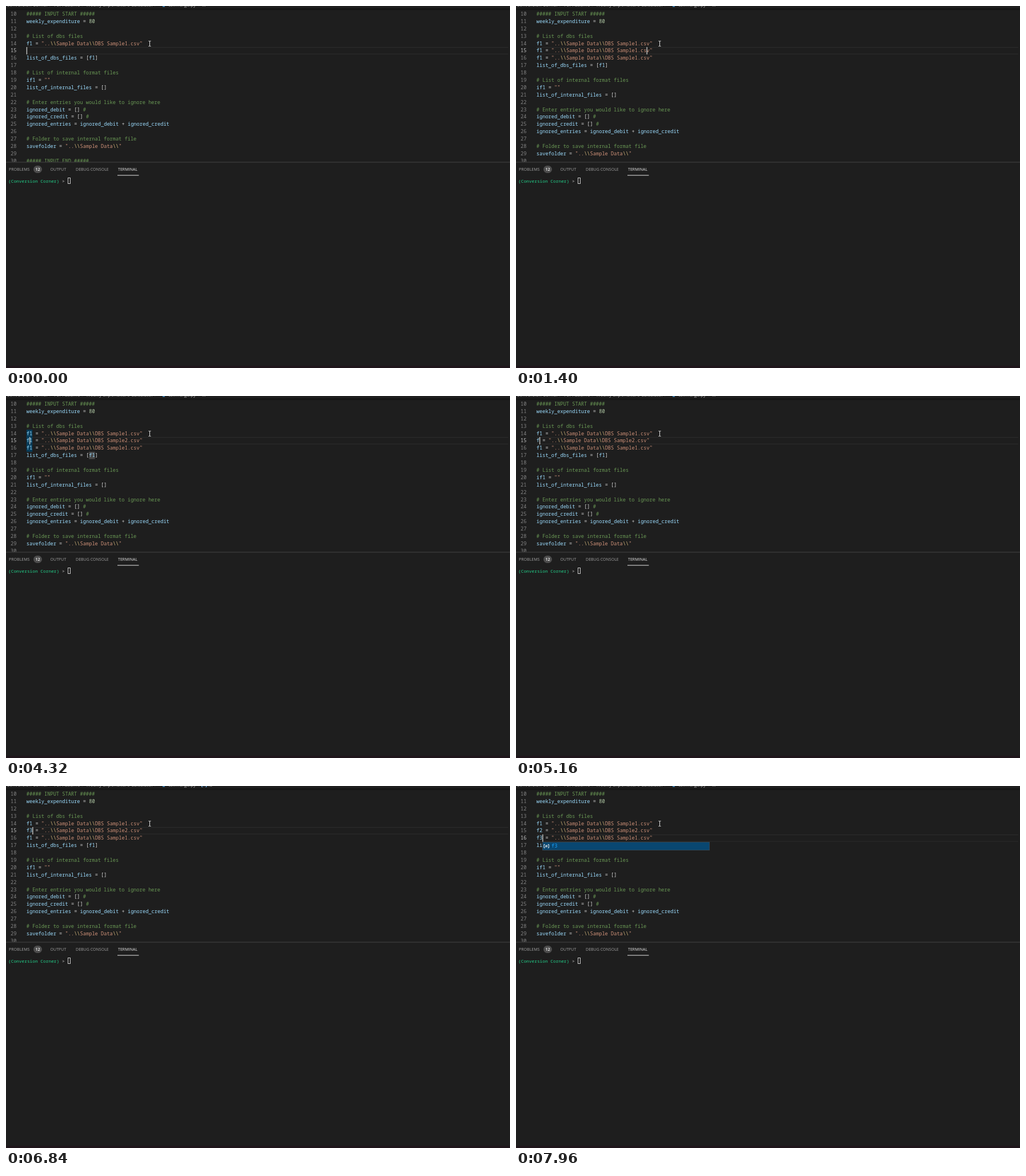
Write an HTML page with a canvas that moves like this. It is 882 px wide and 635 px high and loops after 8 s.

```html
<!DOCTYPE html>
<html lang="en">
<head>
<meta charset="utf-8">
<title>Editor</title>
<style>
html, body { margin: 0; width: 100%; height: 100%; overflow: hidden; background: #1e1e1e; }
canvas { display: block; }
</style>
</head>
<body>
<canvas id="stage" width="882" height="635"></canvas>
<script>
const ctx = document.getElementById('stage').getContext('2d');
const LOOP = 8000, FIRST = 10, LEFT = 35.8, CHAR = 5.21, ROW = 12.89;
const MONO = '"Noto Sans Mono", "DejaVu Sans Mono", monospace';
const CODE = '8.68px ' + MONO;
const SANS = '"Open Sans", "Noto Sans", sans-serif';

const head = String.raw`##### INPUT START #####
weekly_expenditure = 80

# List of dbs files
f1 = "..\\Sample Data\\DBS Sample1.csv"`.split('\n');
const tail = String.raw`list_of_dbs_files = [f1]

# List of internal format files
if1 = ""
list_of_internal_files = []

# Enter entries you would like to ignore here
ignored_debit = [] #
ignored_credit = [] #
ignored_entries = ignored_debit + ignored_credit

# Folder to save internal format file
savefolder = "..\\Sample Data\\"

##### INPUT END #####`.split('\n');
const entry = (name, n) => name + String.raw` = "..\\Sample Data\\DBS Sample${n}.csv"`;
const one = entry('f1', 1);

// Each step overrides the state before it.
const steps = [
  [0, { mid: [''], line: 15, col: 0, on: true, mark: '', popup: '', symbol: '' }],
  [150, { mid: [one], col: 39 }],
  [450, { mid: [one, ''], line: 16, col: 0 }],
  [700, { mid: [one, one], col: 39 }],
  [970, { line: 15 }],
  ...[38, 37, 36, 35, 34].map((col, i) => [1250 + 135 * i, { col }]),
  [2220, { mid: [entry('f1', ''), one], col: 33 }],
  [2750, { on: false }],
  [3150, { mid: [entry('f1', 2), one], col: 34, on: true }],
  [3680, { on: false }],
  [3950, { col: 0, on: true }],
  [4120, { mark: 'f1' }],
  [4320, { col: 1 }],
  [4570, { col: 2 }],
  [4880, { on: false }],
  [5160, { mid: [entry('f', 2), one], col: 1, on: true, mark: '' }],
  [5350, { mid: [entry('f3', 2), one], col: 2, popup: 'f3' }],
  [5530, { line: 16, popup: '', symbol: 'f3' }],
  [5780, { mark: 'f1' }],
  [6060, { on: false }],
  [6560, { on: true }],
  [6840, { line: 15, mark: '' }],
  [7000, { mid: [entry('f', 2), one], col: 1 }],
  [7140, { mid: [entry('f2', 2), one], col: 2, popup: 'f2' }],
  [7450, { line: 16, popup: '' }],
  [7600, { mark: 'f1' }],
  [7720, { mid: [entry('f2', 2), entry('f', 1)], col: 1, mark: '', symbol: '' }],
  [7840, { mid: [entry('f2', 2), entry('f3', 1)], col: 2 }],
  [7960, { popup: 'f3' }]
];

const rowY = line => 7.55 + (line - FIRST) * ROW;
const colX = col => LEFT + col * CHAR;

function box(color, x, y, w, h) {
  ctx.fillStyle = color;
  ctx.fillRect(x, y, w, h);
}

function label(text, x, y, color, font) {
  ctx.font = font;
  ctx.fillStyle = color;
  ctx.fillText(text, x, y);
}

function colorOf(token) {
  if (token[0] === '#') return '#6a9955';
  if (token[0] === '"') return '#ce9178';
  if (/^\d/.test(token)) return '#b5cea8';
  return /^\w/.test(token) ? '#9cdcfe' : '#d4d4d4';
}

function codeLine(text, line, mark) {
  const y = rowY(line);
  for (const m of text.matchAll(/#.*|"[^"]*"|\w+|\S/g)) {
    const token = m[0], color = colorOf(token);
    if (mark && token === mark)
      box(m.index ? '#474747' : '#083d5b', colX(m.index), y, CHAR * 2, ROW);
    let col = m.index;
    for (const part of token.split(/(\\\\)/)) {
      label(part, colX(col), y + 9.4, part[0] === '\\' ? '#d7ba7d' : color, CODE);
      col += part.length;
    }
  }
}

function variableIcon(x, y, color) {
  ctx.strokeStyle = color;
  ctx.lineWidth = 1;
  ctx.beginPath();
  ctx.moveTo(x + 2.3, y - 3); ctx.lineTo(x + .5, y - 3); ctx.lineTo(x + .5, y + 3); ctx.lineTo(x + 2.3, y + 3);
  ctx.moveTo(x + 7.2, y - 3); ctx.lineTo(x + 9, y - 3); ctx.lineTo(x + 9, y + 3); ctx.lineTo(x + 7.2, y + 3);
  ctx.moveTo(x + 6.6, y);
  ctx.ellipse(x + 4.75, y, 1.9, 1.4, 0, 0, 7);
  ctx.moveTo(x + 3, y + 1.5); ctx.lineTo(x + 6.5, y - 1.5);
  ctx.stroke();
}

function breadcrumb(symbol) {
  const font = '8.3px ' + SANS, y = 1.3;
  const items = [['Conversion Corner', 1], ['For Assume', 84], ['Weekly Expenditure Calculator', 140], ['csvmerge.py', 284]];
  for (const [text, x] of items) label(text, x, y, '#a9a9a9', font);
  for (const x of [76, 133, 260, 337]) label('›', x, y, '#a9a9a9', font);
  box('#3c8dc5', 274, 0, 4, 1.5);
  if (symbol) {
    variableIcon(342, -1.5, '#75beff');
    label(symbol, 354, y, '#a9a9a9', font);
  } else label('…', 343, y, '#a9a9a9', font);
  const shade = ctx.createLinearGradient(0, 4.5, 0, 8);
  shade.addColorStop(0, 'rgba(0,0,0,.5)');
  shade.addColorStop(1, 'rgba(0,0,0,0)');
  box(shade, 0, 4.5, 882, 3.5);
}

function mousePointer() {
  const c = '#e0e0e0';
  box(c, 251, 61.5, 1, 9);
  for (const y of [61, 70]) {
    box(c, 249.5, y, 1.5, 1);
    box(c, 252, y, 1.5, 1);
  }
}

function editor(s) {
  ctx.save();
  ctx.beginPath();
  ctx.rect(0, 0, 882, 273.5);
  ctx.clip();
  breadcrumb(s.symbol);
  box('#2a2a2a', 36, rowY(s.line), 843, 1.3);
  box('#2a2a2a', 36, rowY(s.line) + ROW - 1.3, 843, 1.3);
  [...head, ...s.mid, ...tail].forEach((text, i) => {
    const line = FIRST + i;
    if (line > 30) return;
    label(line, 8, rowY(line) + 9.4, line === s.line ? '#c6c6c6' : '#858585', CODE);
    codeLine(text, line, s.mark);
  });
  if (s.on) box('#c4c5c3', colX(s.col) - .1, rowY(s.line), 1.4, ROW);
  if (s.popup) {
    const y = Math.round(rowY(s.line + 1));
    box('#454545', 46, y, 293, 15);
    box('#094771', 46.7, y + .7, 291.6, 13.6);
    variableIcon(48.5, y + 7.5, '#e8e8e8');
    label(s.popup, 62, y + 10.3, '#18a3ff', CODE);
  }
  mousePointer();
  ctx.restore();
}

function panel() {
  const font = '7.05px ' + SANS, dim = '#a0a0a0', base = 289.3;
  box('#444444', 0, 273.5, 882, 1);
  label('PROBLEMS', 5, base, dim, font);
  label('OUTPUT', 77.6, base, dim, font);
  label('DEBUG CONSOLE', 122, base, dim, font);
  label('TERMINAL', 196, base, '#e7e7e7', font);
  box('#e7e7e7', 195, 296.5, 37.5, 1);
  ctx.fillStyle = '#4d4d4d';
  ctx.beginPath();
  ctx.roundRect(48, 280, 15, 13, 6.5);
  ctx.fill();
  label('12', 51.4, base, '#ffffff', '600 7.2px ' + SANS);

  const term = '7.83px ' + MONO;
  label('(Conversion Corner)', 4, 309.8, '#23d18b', term);
  label('>', 98, 309.8, '#cccccc', term);
  ctx.strokeStyle = '#cccccc';
  ctx.lineWidth = 1;
  ctx.strokeRect(108.5, 301.5, 4, 10);
  box('#1f161b', 0, 631, 882, 4);
}

function draw(now) {
  const t = now % LOOP;
  const state = Object.assign({}, ...steps.filter(step => step[0] <= t).map(step => step[1]));
  box('#1e1e1e', 0, 0, 882, 635);
  editor(state);
  panel();
}

const began = performance.now();
function tick() {
  draw(performance.now() - began);
  requestAnimationFrame(tick);
}
tick();
</script>
</body>
</html>
```
